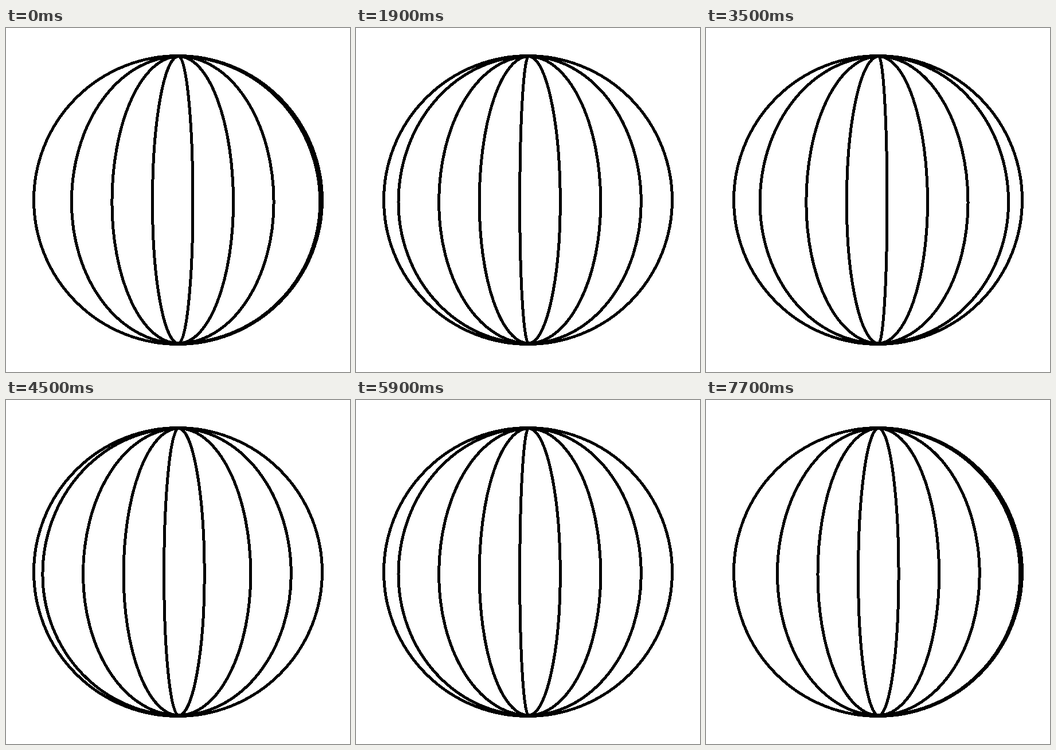
Animation of 600 by 600 pixels, one loop 7.8 s. Source, as an HTML page:

```html
<!DOCTYPE html>
<html lang="en">
<head>
<meta charset="utf-8">
<title>Turning globe</title>
<style>
  html, body { margin: 0; width: 100%; height: 100%; overflow: hidden; background: #fff; }
  svg { display: block; width: 100vw; height: 100vh; }
  circle, path { fill: none; stroke: #000; stroke-width: 5; shape-rendering: crispEdges; }
</style>
</head>
<body>
<svg viewBox="0 0 600 600">
  <circle cx="300" cy="300" r="251.5"/>
  <path id="meridians"/>
</svg>
<script>
  const LOOP = 7800, TICK = 100;
  const POLE_X = 301, TOP = 49.5, EQUATOR = 304, BOTTOM = 550;
  const SLOTS = 50, LINES = 7, SPACING = 7;
  const FIRST_X = 53.85, SLOT_WIDTH = 10.08;
  const meridians = document.getElementById('meridians');

  // Two quarter ellipses from pole to pole, meeting on the equator at x.
  function arc(x) {
    const rx = Math.abs(x - POLE_X);
    const sweep = x > POLE_X ? 1 : 0;
    return `M${POLE_X} ${TOP}` +
      `A${rx} ${EQUATOR - TOP} 0 0 ${sweep} ${x} ${EQUATOR}` +
      `A${rx} ${BOTTOM - EQUATOR} 0 0 ${sweep} ${POLE_X} ${BOTTOM}`;
  }

  function draw(tick) {
    // All lines move left 2.5 slots per tick, in whole slots.
    const start = SLOTS - 1 - Math.floor(tick * 2.5) % SLOTS;
    let d = '';
    for (let i = 0; i < LINES; i++) {
      const slot = (start + i * SPACING) % SLOTS;
      d += arc(FIRST_X + slot * SLOT_WIDTH);
    }
    meridians.setAttribute('d', d);
  }

  const t0 = performance.now();
  function frame() {
    const t = (performance.now() - t0) % LOOP;
    draw(Math.floor(t / TICK));
    requestAnimationFrame(frame);
  }
  frame();
</script>
</body>
</html>
```
